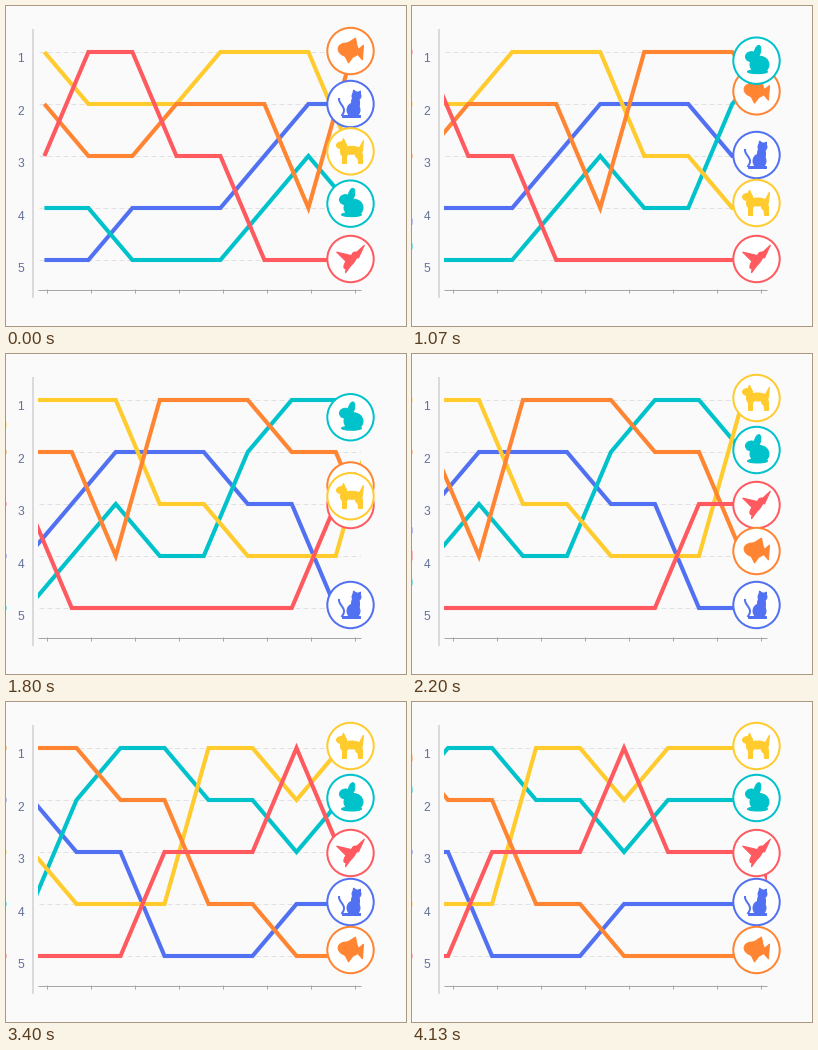
A matplotlib script that plays this animation: 400 px wide and 320 px high, repeating every 4.19 s.

```python
import numpy as np
import matplotlib.pyplot as plt
from matplotlib.animation import FuncAnimation
from matplotlib.patches import Circle, Ellipse, Polygon, Rectangle
from matplotlib.transforms import Affine2D

W, H, DPI = 400, 320, 100
PX = 72 / DPI
FRAMES, LOOP = 63, 4190
SPEED = 7.135            # scroll per frame, px
X0, STEP = 38.4, 44      # first vertex and vertex spacing
TOP, GAP = 46, 52        # height of rank 1 and distance between ranks
HEAD_X = 344.5
BG = "#fafafa"

# name: colour, badge nudge in px, rank at each vertex
SERIES = {
    "cat": ("#5271f2", 1, "5544432223355544444"),
    "rabbit": ("#00c2cb", -1, "4455543442112232222"),
    "dog": ("#ffcb2d", -2, "1222111334441121111"),
    "fish": ("#ff8533", -2, "2332224111224455555"),
    "bird": ("#ff5a5f", 3, "3113355555533313335"),
}
RANKS = {name: np.array([int(c) for c in s[2]]) for name, s in SERIES.items()}
BADGE_ORDER = ["bird", "cat", "fish", "dog", "rabbit"]


def oval(x, y, w, h, angle=0):
    return Ellipse((x, y), w, h, angle=angle)


def poly(*points):
    return Polygon(points)


def animal(name):
    if name == "cat":
        t = np.linspace(0, 1, 20)
        tail = np.c_[-9 + 2.5 * np.sin(5 * t), 12 - 18 * t]
        return [oval(3, 6, 13, 14), oval(5, -1, 8, 15), oval(6, -8, 9, 8),
                poly((2, -8), (3, -14), (7, -11)),
                poly((6, -11), (10, -13), (10, -8)),
                poly((-9, 13), (-9, 11), (9, 11), (9, 13)),
                Polygon(tail, closed=False, fill=False)]
    if name == "rabbit":
        return [oval(3, 4, 19, 17), oval(-5, -4, 12, 10),
                oval(1, -9, 6, 13, 15), oval(1, 11, 20, 4)]
    if name == "dog":
        return [oval(1, -1, 19, 8), oval(-9, -6, 10, 7), oval(-6, 0, 8, 11),
                oval(8, 2, 7, 10), poly((-9, -8), (-7, -13), (-4, -6)),
                poly((-9, 3), (-5, 3), (-5, 12), (-9, 12)),
                poly((6, 3), (11, 3), (11, 12), (7, 12)),
                poly((8, -2), (13, -11), (12, 0))]
    if name == "fish":
        return [oval(-2, -1, 21, 14, 10), poly((5, 1), (13, -6), (12, 9)),
                poly((-6, -6), (5, -13), (7, -3)),
                poly((-6, 4), (-2, 12), (4, 4))]
    return [oval(0, 2, 19, 7, -50), oval(5, -4, 7, 6),
            poly((2, -3), (14, -14), (8, -1)),
            poly((-14, -7), (3, -3), (-2, 5)),
            poly((-4, 5), (0, 7), (-5, 14))]


fig = plt.figure(figsize=(W / DPI, H / DPI), dpi=DPI, facecolor=BG)
ax = fig.add_axes([0, 0, 1, 1])
ax.set(xlim=(0, W), ylim=(H, 0))
ax.axis("off")


def stroke(x, y, color, width, **kw):
    return ax.plot(x, y, color=color, lw=width * PX,
                   solid_capstyle="butt", **kw)[0]


def cover(x, width):
    ax.add_patch(Rectangle((x, 0), width, H, fc=BG, ec="none",
                           zorder=4, snap=False))


def draw_axes():
    for i in range(5):
        y = TOP + GAP * i - .5
        stroke([33, 355], [y, y], "#e2e2e4", 1, zorder=1,
               dashes=(5, 3), dash_capstyle="butt")
        ax.text(14.8, y + 6.3 + .5 * i, str(i + 1), color="#62709a",
                fontsize=12 * PX, family="Liberation Sans", ha="center",
                va="center_baseline", zorder=6)
    stroke([27, 27], [23, 292], "#bcbcbf", 1, zorder=6, snap=False)
    stroke([32, 355], [283.5, 283.5], "#a6a6a8", 1, zorder=6)
    for i in range(8):
        x = 40.5 + STEP * i
        stroke([x, x], [283, 287], "#a6a6a8", 1, zorder=6)


def make_badge(name, z):
    color, pos = SERIES[name][0], Affine2D()
    place = pos + ax.transData
    ring = Circle((0, 0), 23.2, fc="white", ec=color, lw=2 * PX, zorder=z)
    parts = animal(name)
    for part in parts:
        part.set(color=color, lw=1 * PX, zorder=z + .1)
    if name == "cat":
        parts[-1].set(fill=False, lw=2 * PX)
    for part in [ring] + parts:
        part.set_transform(place)
        ax.add_patch(part)
    return pos


def badge_y(name, u):
    """Eased height; badges run ahead of the lines, then lag, once a loop."""
    u += .17 * np.sin(2 * np.pi * (u - 7) / 10)
    i = int(u)
    p = u - i
    a, b = RANKS[name][i:i + 2]
    rank = a + (b - a) * p * p * (3 - 2 * p)
    return TOP + (GAP - 1) * (rank - 1) + SERIES[name][1]


draw_axes()
cover(.4, 31.6)
cover(355, W - 355)
lines = {name: stroke([], [], s[0], 4.1, zorder=2 + .1 * k,
                      solid_joinstyle="miter")
         for k, (name, s) in enumerate(SERIES.items())}
badges = {name: make_badge(name, 8 + k) for k, name in enumerate(BADGE_ORDER)}


def update(frame):
    shift = SPEED * frame
    u = (HEAD_X - X0 + shift) / STEP
    for name, ranks in RANKS.items():
        x = X0 + STEP * np.arange(len(ranks)) - shift
        lines[name].set_data(x, TOP + GAP * (ranks - 1))
        badges[name].clear().translate(HEAD_X, badge_y(name, u))
    return list(lines.values())


anim = FuncAnimation(fig, update, frames=FRAMES, interval=LOOP / FRAMES,
                     repeat=True, repeat_delay=0, blit=False)
plt.show()
```
